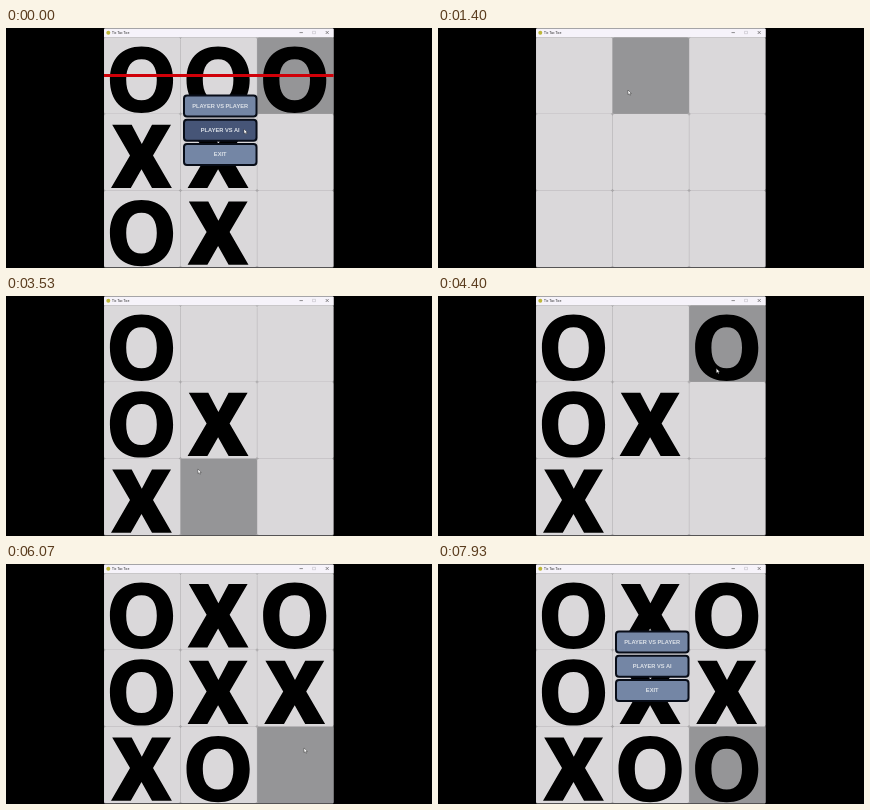
An HTML page for the animation above (8000 ms loop, 426 by 240 pixels).

```html
<!DOCTYPE html>
<html lang="en">
<head>
<meta charset="utf-8">
<title>Tic Tac Toe</title>
<style>
  html, body { margin: 0; width: 100%; height: 100%; overflow: hidden; background: #000; }
  svg { display: block; width: 100%; height: 100%; }
  .cell { fill: #dad8da; }
  .cell.hover { fill: #959597; }
  .button rect { fill: #7486a5; stroke: #080d18; stroke-width: 2; }
  .button.hover rect { fill: #465577; }
  .button text { font: bold 5.7px "Liberation Sans", Arial, sans-serif; fill: #dce1e8; text-anchor: middle; }
  .title { font: 3.5px "Open Sans", sans-serif; fill: #111; }
</style>
</head>
<body>
<svg viewBox="0 0 426 240">
  <defs>
    <clipPath id="window"><rect x="98" y=".4" width="229.6" height="239" rx="1"/></clipPath>
    <path id="O" fill-rule="evenodd" d="M0-33.2C19.5-33.2 31.6-21 31.6 0S19.5 33.2 0 33.2-31.6 21-31.6 0-19.5-33.2 0-33.2Z
      M0-20.4C-10-20.4-15.3-13-15.3 0S-10 20.5 0 20.5 15.3 13 15.3 0 10-20.4 0-20.4Z"/>
    <path id="X" d="M-29.3-31.7H-9.8L.3-12.4 10.5-31.7H29.5L11.5-1 30.4 31.7H10.5L0 12.8-10.7 31.7H-30.5L-11.5-1Z"/>
  </defs>
  <g clip-path="url(#window)">
    <rect x="98" width="230" height="240" fill="#aaa8aa"/>
    <rect x="98" width="230" height="9.2" fill="#f6f3fa"/>
    <circle cx="102.3" cy="4.7" r="2" fill="#bdb63a"/>
    <text class="title" x="106" y="6">Tic Tac Toe</text>
    <g fill="none" stroke="#444" stroke-width=".6">
      <path d="M293.5 4.6h3.4M319.7 3l3 3m0-3l-3 3"/>
      <rect x="306.7" y="3.2" width="2.6" height="2.6" stroke="#c4c1c8"/>
    </g>
    <g id="cells"></g>
    <g id="marks"></g>
    <path id="strike" d="M98 47.5H328" stroke="#d00008" stroke-width="3"/>
    <g id="menu"></g>
    <path id="cursor" d="M0 0V4.6L1.1 3.7 1.9 5.3 2.7 4.9 2 3.4H3.4Z" fill="#fff" stroke="#222" stroke-width=".4"/>
  </g>
</svg>
<script>
const LOOP = 8000, STEP = LOOP / 120;
const LEFT = 97.9, TOP = 9.2, CELL_WIDTH = 76.6, CELL_HEIGHT = 76.7;
const RESTART = 750, MENU_BACK = 6500;

// Each move: mark, cell index, time placed
const moves = [
  ['O', 0, 2250], ['X', 4, 2600], ['O', 3, 2850], ['X', 6, 3200], ['O', 2, 4200],
  ['X', 1, 4450], ['O', 7, 4850], ['X', 5, 5150], ['O', 8, 6200]
];
const previousGame = ['O', 'O', 'O', 'X', 'X', '', 'O', 'X', ''];

// Pointer path: time, x, y
const pointerPath = [
  [0, 238, 101], [500, 222, 103], [750, 215, 102], [1400, 190, 62], [2050, 160, 73],
  [2330, 162, 76], [2800, 141, 125], [3530, 193, 174], [4100, 285, 60], [4300, 284, 61],
  [4850, 219, 192], [5270, 227, 189], [6000, 298, 184], [6930, 300, 180],
  [7400, 303, 183], [7800, 340, 205], [8000, 340, 205]
];

const byId = id => document.getElementById(id);
const show = (node, visible) => node.style.display = visible ? '' : 'none';

function add(parent, tag, attributes, text = '') {
  const node = document.createElementNS('http://www.w3.org/2000/svg', tag);
  for (const name in attributes) node.setAttribute(name, attributes[name]);
  node.textContent = text;
  return parent.appendChild(node);
}

const cells = [], marks = [];
for (let i = 0; i < 9; i++) {
  const x = LEFT + i % 3 * CELL_WIDTH, y = TOP + Math.floor(i / 3) * CELL_HEIGHT;
  cells.push(add(byId('cells'), 'rect', {
    class: 'cell', x: x + .2, y: y + .2, width: CELL_WIDTH - .4, height: CELL_HEIGHT - .4, rx: 1.8
  }));
  marks.push(add(byId('marks'), 'use', { transform: `translate(${x + 37.6} ${y + 42.5})` }));
}

const buttons = ['PLAYER VS PLAYER', 'PLAYER VS AI', 'EXIT'].map((label, i) => {
  const y = 67.5 + i * 24.2, group = add(byId('menu'), 'g', { class: 'button' });
  add(group, 'rect', { x: 178, y, width: 72.5, height: 21, rx: 3 });
  add(group, 'text', { x: 214.2, y: y + 12.3 }, label);
  return { group, y };
});

function pointerAt(t) {
  const i = pointerPath.findIndex(point => point[0] > t);
  const [t0, x0, y0] = pointerPath[i - 1], [t1, x1, y1] = pointerPath[i];
  const p = (t - t0) / (t1 - t0), eased = p * p * (3 - 2 * p);
  return [x0 + (x1 - x0) * eased, y0 + (y1 - y0) * eased];
}

function draw(t) {
  const [x, y] = pointerAt(t);
  const oldGame = t < RESTART, menuOpen = oldGame || t >= MENU_BACK;
  const board = oldGame ? previousGame : Array(9).fill('');
  if (!oldGame) for (const [mark, cell, time] of moves) if (t >= time) board[cell] = mark;

  const column = Math.floor((x - LEFT) / CELL_WIDTH), row = Math.floor((y - TOP) / CELL_HEIGHT);
  const hovered = oldGame ? 2 : menuOpen ? 8 : row * 3 + column;
  cells.forEach((cell, i) => {
    cell.classList.toggle('hover', i === hovered);
    marks[i].setAttribute('href', '#' + board[i]);
    show(marks[i], board[i]);
  });

  show(byId('strike'), oldGame);
  show(byId('menu'), menuOpen);
  for (const { group, y: top } of buttons) {
    group.classList.toggle('hover', x > 177 && x < 251 && y > top && y < top + 21);
  }
  byId('cursor').setAttribute('transform', `translate(${x} ${y})`);
}

const start = performance.now();
function tick() {
  const t = (performance.now() - start) % LOOP;
  draw(Math.floor(t / STEP) * STEP);
  requestAnimationFrame(tick);
}
tick();
</script>
</body>
</html>
```
